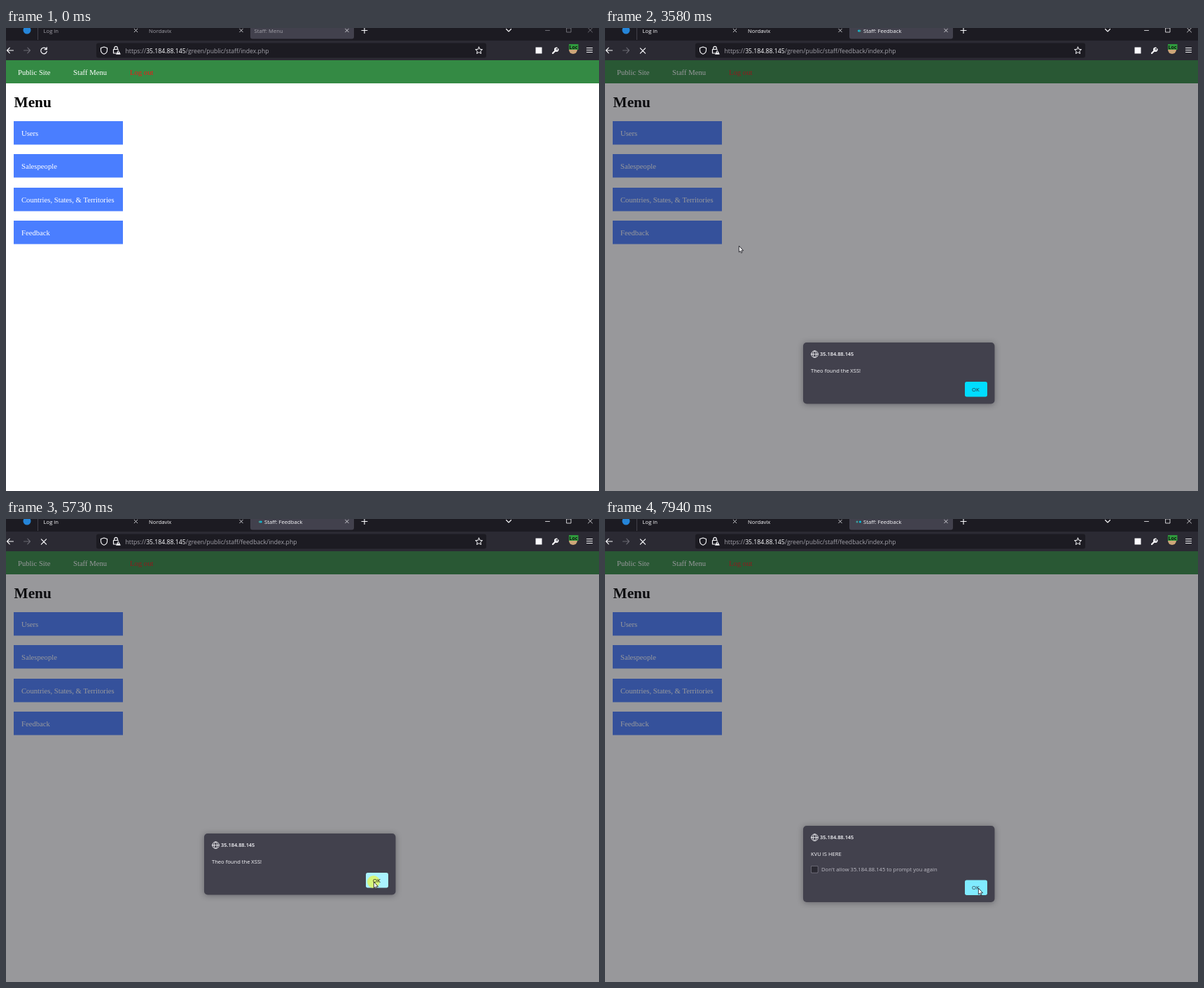
Animation of 847x661 px, one loop 8000 ms. Source, as an HTML page with a canvas:

```html
<!DOCTYPE html>
<html lang="en">
<head>
<meta charset="utf-8">
<title>Staff menu</title>
<style>
html, body { margin: 0; width: 100%; height: 100%; overflow: hidden; background: #fff; }
canvas { display: block; }
</style>
</head>
<body>
<canvas id="stage" width="847" height="661"></canvas>
<script>
const ctx = document.getElementById('stage').getContext('2d');
const LOOP = 8000, TICK = 200 / 3;
const UI = '"Open Sans", "Noto Sans", sans-serif';
const SERIF = '"Liberation Serif", serif';
const WHITE = '#fbfbfe', MUTED = '#a3a2aa', DARK = '#1c1b22', BAR = '#2b2a33', PANEL = '#42414d';
const HOST = '35.184.88.145';
const BUTTONS = ['Users', 'Salespeople', 'Countries, States, & Territories', 'Feedback'];

const CLICK_LINK = 2867, LOADING = 3000, FIRST_ALERT = 3333;
const CLICK_OK = 5733, FIRST_CLOSED = 5800, SECOND_ALERT = 5866;

// Pointer stops: time, x, y
const PATH = [
  [333, 726, 585], [400, 665, 550], [467, 613, 522], [600, 613, 522],
  [1067, 37, 298], [1600, 37, 298], [1967, 47, 150], [2067, 48, 146],
  [2333, 53, 303], [2467, 54, 317], [2600, 54, 317], [2800, 52, 298],
  [3400, 52, 298], [3733, 447, 335], [4000, 480, 372], [4400, 525, 517],
  [6067, 525, 518], [6667, 536, 531], [6867, 536, 531], [7600, 533, 527]
];

function pointerAt(t) {
  if (t < PATH[0][0] - 1) return null;
  const i = PATH.findIndex(p => p[0] > t);
  if (i < 0) return PATH[PATH.length - 1].slice(1);
  if (i === 0) return PATH[0].slice(1);
  const [t0, x0, y0] = PATH[i - 1], [t1, x1, y1] = PATH[i];
  const k = (t - t0) / (t1 - t0), e = k * k * (3 - 2 * k);
  return [Math.round(x0 + (x1 - x0) * e), Math.round(y0 + (y1 - y0) * e)];
}

function rect(x, y, w, h, color, r = 0) {
  ctx.fillStyle = color;
  ctx.beginPath();
  ctx.roundRect(x, y, w, h, r);
  ctx.fill();
}

function disc(x, y, r, color) {
  ctx.fillStyle = color;
  ctx.beginPath();
  ctx.arc(x, y, r, 0, 7);
  ctx.fill();
}

function text(str, x, y, size, color, family = UI, weight = 400) {
  ctx.font = `${weight} ${size}px ${family}`;
  ctx.fillStyle = color;
  ctx.fillText(str, x, y);
  return x + ctx.measureText(str).width;
}

function stroke(d, x, y, color = WHITE, width = 1, fill) {
  const path = new Path2D(d);
  ctx.save();
  ctx.translate(x, y);
  ctx.lineWidth = width;
  ctx.lineJoin = ctx.lineCap = 'round';
  if (fill) { ctx.fillStyle = fill; ctx.fill(path); }
  ctx.strokeStyle = color;
  ctx.stroke(path);
  ctx.restore();
}

const cross = (x, y, r, color, width) =>
  stroke(`M${-r} ${-r}L${r} ${r}M${r} ${-r}L${-r} ${r}`, x, y, color, width);

function throbber(t) {
  const c = (t - 5940) / 1050 + 0.25;
  for (const [lag, color] of [[-0.12, '#00c8e8'], [0.12, '#3f9d9b']])
    disc(360.5 + 4 * Math.cos(2 * Math.PI * (c + lag)), 4, 1.5, color);
}

function tabs(t) {
  const active = t >= CLICK_LINK, loaded = t >= FIRST_ALERT, loading = t >= LOADING;
  const label = active ? WHITE : MUTED;
  const control = active ? WHITE : '#85848c';
  rect(0, 0, 847, 18, DARK);
  disc(30, 3, 5.5, '#2585d8');
  rect(45, 0, 1, 17, '#42414a');
  rect(349, -6, 148, 21.5, PANEL, 3);
  text('Log in', 53.5, 7, 7.7, label);
  text('Nordavix', 204, 7, 7.7, label);
  if (loading) throbber(t);
  text(loaded ? 'Staff: Feedback' : 'Staff: Menu', loading ? 369 : 354.5, 7, 7.7, label);
  for (const x of [185.5, 336, 487]) cross(x, 3.5, 2.3, '#d8d8dd', 0.9);
  stroke('M-4 0H4M0-4V4', 512, 3.5, WHITE, 1.1);
  stroke('M-3.5-1.5L0 2L3.5-1.5', 718, 3, WHITE, 1.1);
  stroke('M-3 0H3', 773.5, 3.5, control, 0.8);
  stroke('M-3-3H3V3H-3Z', 804, 3, control, 0.8);
  cross(834.5, 3, 3, control, 0.8);
}

function toolbar(t) {
  rect(0, 18, 847, 28, BAR);
  const arrow = 'M-4.5 0H4.5M-.8-3.8L-4.5 0L-.8 3.8';
  stroke(arrow, 6, 32, WHITE, 1.1);
  stroke('M-4.5 0H4.5M.8-3.8L4.5 0L.8 3.8', 30, 32, '#6b6a73', 1.1);
  if (t >= LOADING) cross(54, 32.5, 3.6, WHITE, 1.2);
  else stroke('M3.8-2A4.3 4.3 0 1 0 4.3 1M4.2-4.6V-1.6H1.2', 54, 32.3, WHITE, 1.2);

  rect(129, 21.5, 557, 21, DARK, 3);
  stroke('M0-5L4.5-3.4V-.5C4.5 2.5 2.5 4.4 0 5.3C-2.5 4.4-4.5 2.5-4.5-.5V-3.4Z', 140, 32, WHITE, 1.1);
  stroke('M-2.2-1V-3A2.2 2.2 0 0 1 2.2-3V-1M0 4.5H-3.5V-1H3.3', 157, 31.5, WHITE, 1.2);
  stroke('M0-2.8L2.8 2.3H-2.8Z', 160.5, 35, WHITE, 0.8, WHITE);
  rect(160.1, 33.6, 0.9, 2, DARK);

  let x = text('https://', 170.5, 36, 8.7, MUTED);
  x = text(HOST, x, 36, 8.7, WHITE);
  const folder = t >= FIRST_ALERT ? 'feedback/' : '';
  text(`/green/public/staff/${folder}index.php`, x, 36, 8.7, MUTED);

  let star = '';
  for (let i = 0; i < 10; i++) {
    const r = i % 2 ? 2.4 : 5.2, a = Math.PI * (i / 5 - 0.5);
    star += `${i ? 'L' : 'M'}${r * Math.cos(a)} ${r * Math.sin(a)}`;
  }
  stroke(star + 'Z', 675.5, 32.3, WHITE, 1);
  rect(756.5, 27.5, 9, 9, WHITE);
  stroke('M-4 4L.8-.8', 785, 32, WHITE, 2.2);
  stroke('M3.6-1.8A2.4 2.4 0 1 1 1.8-3.6', 785, 32, WHITE, 1.8);
  disc(810, 31, 6, '#cda678');
  rect(804, 23, 13.5, 8, '#2f9a3d');
  text('Loc', 804.5, 29.8, 7, '#10130f', UI, 700);
  stroke('M-4 -3H4M-4 0H4M-4 3H4', 833.5, 31.5, WHITE, 1);
}

const buttonTop = i => 133 + Math.round(47.25 * i);

function page(hovered) {
  rect(0, 46, 847, 615, '#fff');
  rect(0, 46, 847, 33, '#348a44');
  text('Public Site', 17, 67, 10.67, '#fff', SERIF);
  text('Staff Menu', 96, 67, 10.67, '#fff', SERIF);
  text('Log out', 177, 67, 10.67, '#f01818', SERIF);
  text('Menu', 11.5, 113, 21.33, '#000', SERIF, 700);
  BUTTONS.forEach((name, i) => {
    const y = buttonTop(i);
    rect(11, y, 156, 33.6, i === hovered ? '#3f6fe0' : '#4a7eff');
    text(name, 22, y + 20.5, 10.67, '#fff', SERIF);
  });
}

function globe(x, y) {
  stroke('M-4.8 0A4.8 4.8 0 1 0 4.8 0A4.8 4.8 0 1 0-4.8 0M-4.8 0H4.8' +
    'M0-4.8C-3-2-3 2 0 4.8C3 2 3-2 0-4.8', x, y, WHITE, 0.9);
}

function alertBox(second, pointer, pressed) {
  const top = second ? 438 : 449, height = second ? 109 : 87.5;
  const okTop = second ? 515.5 : 505;
  ctx.fillStyle = 'rgba(28,27,34,0.45)';
  ctx.fillRect(0, 46, 847, 615);
  ctx.save();
  ctx.shadowColor = 'rgba(28,27,34,0.4)';
  ctx.shadowBlur = 8;
  ctx.shadowOffsetY = 1;
  rect(283, top, 273.5, height, PANEL, 5);
  ctx.restore();
  globe(299.5, top + 16.7);
  text(HOST, 307, top + 19.3, 7.4, WHITE, UI, 600);
  text(second ? 'KVU IS HERE' : 'Theo found the XSS!', 294, top + 43, 7.6, WHITE);
  if (second) {
    rect(294, 495, 10.5, 10.5, '#7c7b87', 1.5);
    rect(294.7, 495.7, 9.1, 9.1, BAR, 1);
    text(`Don't allow ${HOST} to prompt you again`, 309, 502.7, 7.63, '#bdbcc5');
  }
  const [x, y] = pointer;
  const over = x >= 514 && x < 546 && y >= okTop && y < okTop + 21.5;
  rect(514, okTop, 32, 21.5, pressed ? '#aaf2ff' : over ? '#80ebff' : '#00ddff', 2.7);
  text('OK', 524, okTop + 13.7, 7.7, BAR);
}

function drawPointer([x, y], hand) {
  if (hand) {
    stroke('M0 1.2C0-.3 2-.3 2 1.2V5L5.8 5.8C6.8 6 7 6.7 6.8 7.8L6 12H1L-2.2 7.8' +
      'C-2.6 6.6-1.2 6.2 0 7.6Z', x, y, '#15151c', 0.8, '#fff');
    stroke('M3.4 5.5V7M5.1 5.8V7.2', x, y, '#15151c', 0.5);
  } else {
    stroke('M0 0V8.6L1.9 6.9L3.2 9.8L4.5 9.2L3.3 6.4H5.8Z', x + 0.4, y + 0.4, '#15151c', 0.8, '#fff');
  }
}

function render(t) {
  const pointer = pointerAt(t);
  const first = t >= FIRST_ALERT && t < FIRST_CLOSED, second = t >= SECOND_ALERT;
  const modal = first || second;
  const hovered = !pointer || modal ? -1 : BUTTONS.findIndex((_, i) => {
    const dy = pointer[1] - buttonTop(i);
    return pointer[0] >= 11 && pointer[0] < 167 && dy >= 0 && dy < 33.6;
  });
  const okPressed = t >= CLICK_OK - 1 && t < FIRST_CLOSED - 1;
  const linkPressed = t >= CLICK_LINK - 1 && t < LOADING - 1;

  page(hovered);
  tabs(t);
  toolbar(t);
  if (modal) alertBox(second, pointer, okPressed);
  if (okPressed || linkPressed) disc(pointer[0], pointer[1], 9, 'rgba(240,246,50,0.65)');
  if (okPressed) text('OK', 524, 518.7, 7.7, BAR);
  if (pointer) drawPointer(pointer, hovered >= 0);
}

const start = performance.now();
function loop() {
  const t = (performance.now() - start) % LOOP;
  render(Math.round(Math.floor((t + 15) / TICK) * TICK));
  requestAnimationFrame(loop);
}
loop();
</script>
</body>
</html>
```
